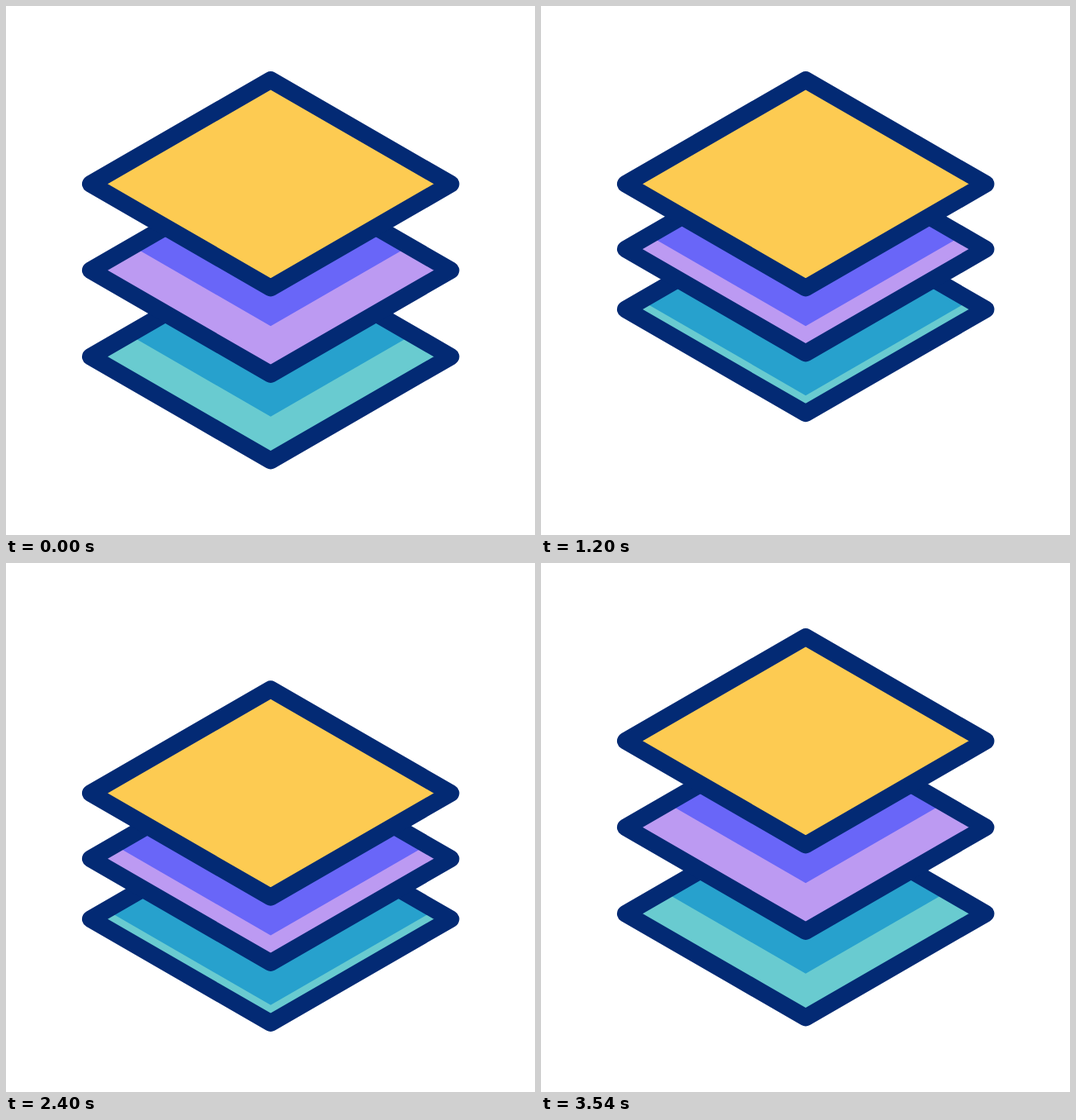
Animation, 640 px wide and 640 px high, one loop 3.6 s. Source, as an HTML page:

```html
<!DOCTYPE html>
<html lang="en">
<head>
<meta charset="utf-8">
<title>Layers</title>
<style>
  html, body { margin: 0; width: 100%; height: 100%; overflow: hidden; background: #fff; }
  svg { display: block; width: 100vw; height: 100vh; }
  .edge { fill: none; stroke: #032a74; stroke-width: 20.7; stroke-linejoin: round; }
</style>
</head>
<body>
<svg viewBox="0 0 640 640">
  <defs>
    <path id="tile" d="M0-125.8 217.9 0 0 125.8-217.9 0Z"/>
    <clipPath id="inside"><use href="#tile"/></clipPath>
  </defs>
  <g id="bottom">
    <use href="#tile" fill="#69cbd0"/>
    <g clip-path="url(#inside)"><path class="shade" fill="#27a1cd" d="M0-177 306.6 0 0 177-306.6 0Z"/></g>
    <use href="#tile" class="edge"/>
  </g>
  <g id="middle">
    <use href="#tile" fill="#bc9af2"/>
    <g clip-path="url(#inside)"><path class="shade" fill="#6966f8" d="M0-172 297.9 0 0 172-297.9 0Z"/></g>
    <use href="#tile" class="edge"/>
  </g>
  <g id="top">
    <use href="#tile" fill="#fdcb52"/>
    <use href="#tile" class="edge"/>
  </g>
</svg>
<script>
  const LOOP = 3600, TOP = 215.3, GAP = 104.45, DROP = 63.9;

  const layers = ['top', 'middle', 'bottom'].map(id => {
    const node = document.getElementById(id);
    return { node, shade: node.querySelector('.shade') };
  });

  // Progress from start to end, eased like cubic-bezier(a, 0, b, 1).
  function tween(t, start, end, a, b) {
    const x = Math.min(1, Math.max(0, (t - start) / (end - start)));
    let lo = 0, hi = 1;
    while (hi - lo > 1e-6) {
      const s = (lo + hi) / 2, r = 1 - s;
      if (3 * s * r * r * a + 3 * s * s * r * b + s ** 3 < x) lo = s;
      else hi = s;
    }
    return lo * lo * (3 - 2 * lo);
  }

  // The stack closes upwards, falls with the lowest layer leading, then opens again.
  function heightAt(i, t) {
    const lift = i * (22.6 + 3 * i);
    const close = tween(t, 0, 920, .36, .64);
    const fall = tween(t, 1410 - 75 * i, 2470, .36, .64 - .19 * i);
    const open = tween(t, 2470, 3540, .6, .44 - .09 * i);
    return TOP + GAP * i + (DROP * fall - lift * close) * (1 - open);
  }

  function draw(t) {
    let above = 0;
    layers.forEach(({ node, shade }, i) => {
      const y = heightAt(i, t);
      node.setAttribute('transform', `translate(320.2 ${y})`);
      if (shade) shade.setAttribute('transform', `translate(0 ${above - y})`);
      above = y;
    });
  }

  const began = performance.now();
  function tick() {
    draw((performance.now() - began) % LOOP);
    requestAnimationFrame(tick);
  }
  tick();
</script>
</body>
</html>
```
